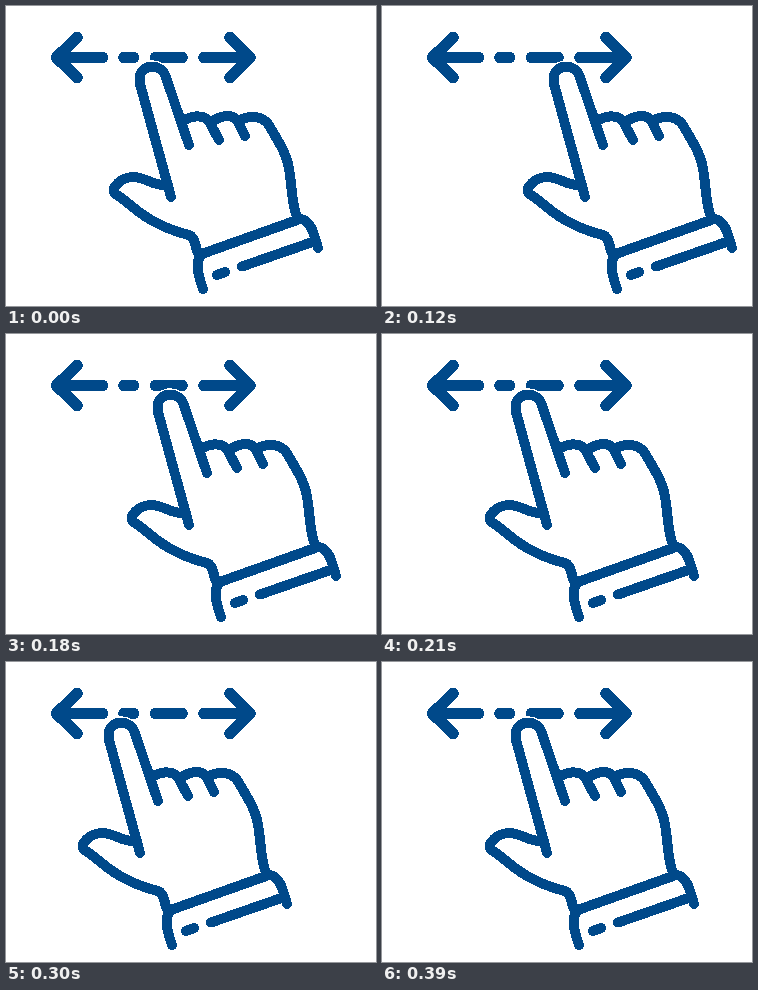
These frames come from a looping animation (370 px wide and 300 px high, 420 ms). An HTML page:

```html
<!DOCTYPE html>
<html lang="en">
<head>
<meta charset="utf-8">
<title>Swipe gesture</title>
<style>
  html, body { margin: 0; width: 100%; height: 100%; overflow: hidden; background: #fff; }
  svg { display: block; width: 370px; height: 300px; }
  path { fill: none; stroke: #00498a; stroke-width: 10; stroke-linecap: round; stroke-linejoin: round; shape-rendering: crispEdges; }
  .arrows { stroke-width: 11.5; }
  .halo { stroke: #fff; stroke-width: 12.5; }
</style>
</head>
<body>
<svg viewBox="0 0 370 300">
  <path class="arrows" d="M96.500 51.500H50.500M71 31.500L50.500 51.500L71 71.500M118 51.500H127.500M149.500 51.500H176M198 51.500H244M224 31.500L244 51.500L224 71.500"/>
  <g id="hand">
    <path class="halo" d="M134 78C130 58 154 55 159.500 70"/>
    <!-- index finger -->
    <path d="M165 191L134 78C130 58 154 55 159.500 70L183 139"/>
    <!-- knuckles and back of the hand -->
    <path d="M177 115C186 109 199 108 204 117L213 134M205 117C213 109 228 107 232 116L239 130M232 115C245 108 258 110 264 121C272 135 281 148 283 163C286 178 285 195 291 211"/>
    <!-- thumb and palm -->
    <path d="M162 179C148 181 138 170 126 171C115 172 105 181 108.500 187.500C120 193 130 207 149 216C161 223 175 227 184.500 229.500C190 234 189 240 191.500 246"/>
    <!-- cuff -->
    <path d="M197 283C191.500 268 188 251 198.500 247L294 213C304 214 307 224 312 242M236 260.500L308 235.500M211 269L219 266"/>
  </g>
</svg>
<script>
  const LOOP = 420, STEP = 30;
  // [step, horizontal offset]
  const keys = [[0, 0], [2, 18], [4, 38], [6, 18], [8, -19], [10, -31], [13, 0], [14, 0]];
  const hand = document.getElementById('hand');

  function offsetAt(step) {
    const i = keys.findIndex(([s]) => s > step);
    const [s0, x0] = keys[i - 1], [s1, x1] = keys[i];
    return Math.round(x0 + (x1 - x0) * (step - s0) / (s1 - s0));
  }

  function draw() {
    const step = Math.floor(performance.now() % LOOP / STEP);
    hand.setAttribute('transform', `translate(${offsetAt(step)} 0)`);
    requestAnimationFrame(draw);
  }
  draw();
</script>
</body>
</html>
```
